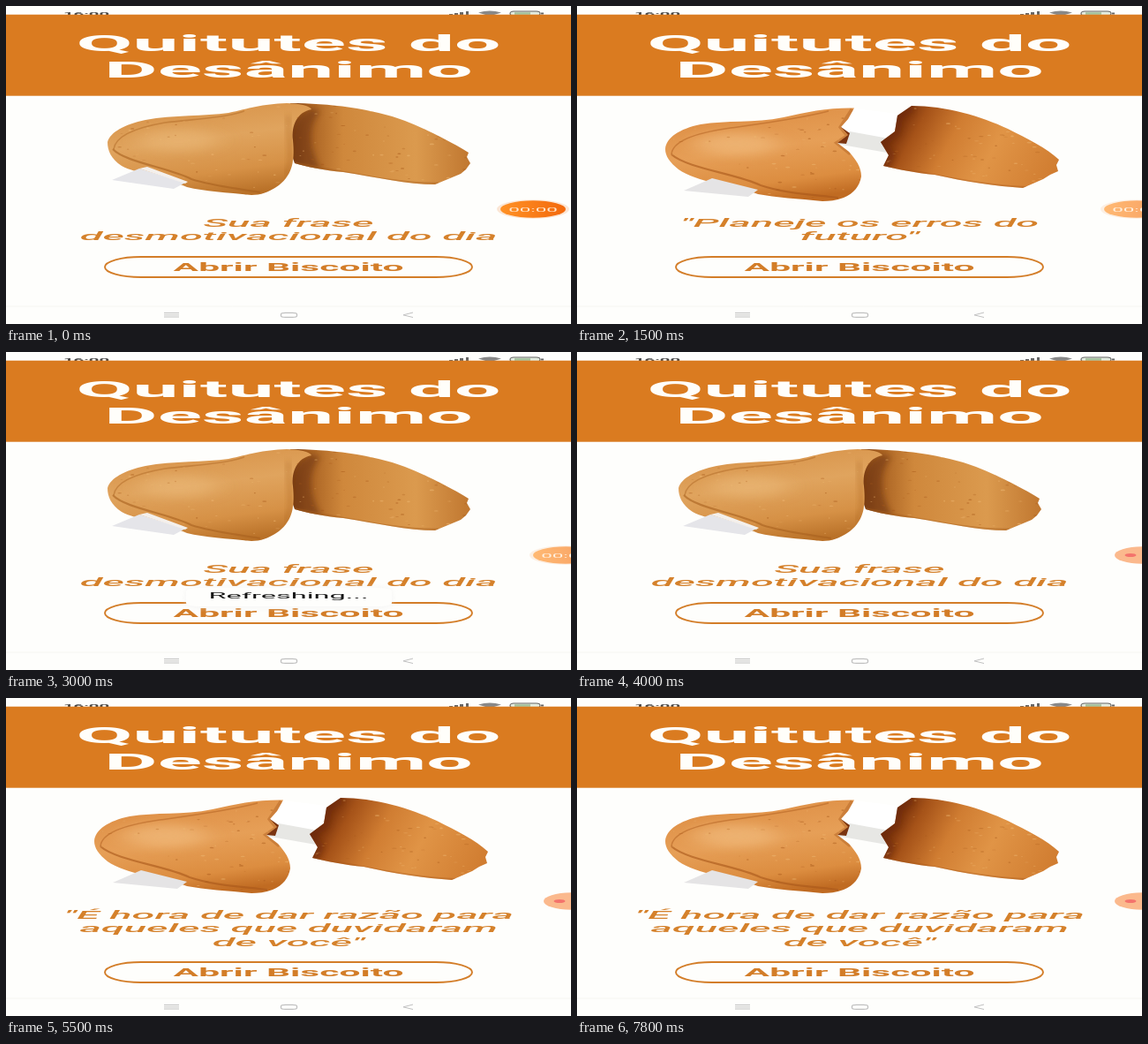
These frames come from a looping animation (640x360 px, 8 s). An HTML page:

```html
<!DOCTYPE html>
<html lang="pt">
<head>
<meta charset="utf-8">
<title>Quitutes do Desânimo</title>
<style>
html, body { margin: 0; width: 100%; height: 100%; overflow: hidden; background: #fefefc; }
svg { display: block; width: 640px; height: 360px; }
text { font-family: Roboto, Arial, sans-serif; text-anchor: middle; }
.title { font-size: 26.1px; font-weight: 700; fill: #fffefa; }
.phrase { font-size: 13.2px; font-weight: 500; font-style: italic; fill: #d5812b; }
.label { font-size: 11.95px; font-weight: 700; fill: #d37d28; }
.note { font-size: 9.15px; fill: #151515; }
.clock { font-size: 5.7px; font-weight: 700; fill: #444; }
.timer { font-size: 7px; fill: #ffe6cc; }

.whole, .split, .first, .second, .toast, .shift, .digits { animation: 8s step-end infinite; }
.whole { animation-name: whole; }
.split { animation-name: split; }
.first { animation-name: first; }
.second { animation-name: second; }
.toast { animation-name: toast; }
.shift { animation-name: shift; }
.digits { animation-name: digits; }
.press { animation: press 8s linear infinite; }
.ball { animation: ball 8s linear infinite; }
.dock { animation: dock 8s linear infinite; }

@keyframes whole { 0% { opacity: 1 } 3.125% { opacity: 0 } 35% { opacity: 1 } 64.375%, 100% { opacity: 0 } }
@keyframes split { 0% { opacity: 0 } 3.125% { opacity: 1 } 35% { opacity: 0 } 64.375%, 100% { opacity: 1 } }
@keyframes first { 0% { opacity: 0 } 3.125% { opacity: 1 } 35%, 100% { opacity: 0 } }
@keyframes second { 0% { opacity: 0 } 64.375%, 100% { opacity: 1 } }
@keyframes toast { 0% { opacity: 0 } 33.75% { opacity: 1 } 42.5%, 100% { opacity: 0 } }
@keyframes shift { 0% { transform: translateY(0) } 64.375%, 100% { transform: translateY(15px) } }
@keyframes press {
  0%, 1.25% { opacity: 1 } 2.5%, 3.125% { opacity: .2 } 5.625%, 60.5% { opacity: 1 }
  62.4%, 64.375% { opacity: .2 } 67.5%, 100% { opacity: 1 }
}
@keyframes ball {
  0%, 12.5% { transform: none; opacity: 1 }
  16.25%, 46.25% { transform: translateX(37px); opacity: .64 }
  50%, 100% { transform: translateX(49px); opacity: 0 }
}
@keyframes dock { 0%, 46.25% { opacity: 0 } 50%, 100% { opacity: 1 } }
@keyframes digits {
  0% { transform: none } 5% { transform: translateY(-30px) } 16.25% { transform: translateY(-60px) }
  28.75% { transform: translateY(-90px) } 41.25%, 100% { transform: translateY(-120px) }
}
</style>
</head>
<body>
<svg viewBox="0 0 640 360">
  <defs>
    <linearGradient id="dough" x1=".3" y1="0" x2=".6" y2="1">
      <stop offset="0" stop-color="#d79248"/><stop offset=".4" stop-color="#e0a45e"/>
      <stop offset=".75" stop-color="#d69146"/><stop offset="1" stop-color="#b97128"/>
    </linearGradient>
    <linearGradient id="flap">
      <stop offset="0" stop-color="#6f330c"/><stop offset=".1" stop-color="#a65f20"/>
      <stop offset=".3" stop-color="#cf883c"/><stop offset=".7" stop-color="#db9a4e"/>
      <stop offset="1" stop-color="#c07730"/>
    </linearGradient>
    <linearGradient id="warm" x1=".3" y1="0" x2=".6" y2="1">
      <stop offset="0" stop-color="#dd8d43"/><stop offset=".45" stop-color="#e69f57"/>
      <stop offset=".8" stop-color="#dc8d40"/><stop offset="1" stop-color="#c06b22"/>
    </linearGradient>
    <linearGradient id="piece" x1="0" y1=".5" x2="1" y2=".75">
      <stop offset="0" stop-color="#6e2a08"/><stop offset=".14" stop-color="#a55218"/>
      <stop offset=".35" stop-color="#d07d32"/><stop offset=".6" stop-color="#e09446"/>
      <stop offset="1" stop-color="#d07c30"/>
    </linearGradient>
    <linearGradient id="glow">
      <stop offset="0" stop-color="#ff9226"/><stop offset="1" stop-color="#f3690c"/>
    </linearGradient>
    <filter id="soft" x="-20%" y="-20%" width="140%" height="140%"><feGaussianBlur stdDeviation="3"/></filter>
    <filter id="haze" x="-50%" y="-80%" width="200%" height="260%"><feGaussianBlur stdDeviation="14 6"/></filter>
    <clipPath id="ballClip"><ellipse cx="597" cy="230" rx="37" ry="9.7"/></clipPath>
    <path id="wholeLeft" d="M115 154C118 143 134 134 158 129C190 123 225 125 252 121C275 116 290 111 318 110C332 110 344 113 346 117C330 120 323 135 325 152C327 172 326 190 309 203C298 211 288 214 278 214C250 211 225 210 205 205C180 194 148 190 131 181C119 173 115 164 115 154Z"/>
    <path id="wholeRight" d="M322 110C365 110 415 116 452 130C482 142 508 156 524 166L522 171L526 178L521 185L515 190L503 195L486 202C455 202 420 194 382 188C360 186 341 182 327 178C319 158 319 132 322 110Z"/>
    <path id="splitLeft" d="M100 162C101 149 116 139 140 134C170 129 200 133 234 126C260 120 285 115 314 115.500L307 128L299 137L307 146L295 155L308 165C316 174 322 182 322 193C320 204 314 212 302 217C293 220 286 221 278 221C250 218 226 217 205 213C180 204 134 199 115 185C105 177 100 170 100 162Z"/>
    <path id="splitRight" d="M379 113C418 113 458 125 488 139C510 150 532 161 546 174L543 180L545 187L536 191L528 196L505 206C475 204 440 199 405 191C384 189 364 185 347 181L353 169L344 154L360 142L363 124Z"/>
    <clipPath id="wholeClip"><use href="#wholeLeft"/><use href="#wholeRight"/></clipPath>
    <clipPath id="splitClip"><use href="#splitLeft"/><use href="#splitRight"/></clipPath>
  </defs>

  <rect width="640" height="360" fill="#fefefc"/>

  <!-- status bar -->
  <g fill="#666">
    <text class="clock" transform="translate(91 10.8) scale(3.556 1)">16:00</text>
    <path d="M502 9h4v2h-4zM508 8h4v3h-4zM514 7h4v4h-4zM521 6h3v5h-3z"/>
    <path d="M535 7.5Q548 3.5 561 7.5L548 11.5Z" fill="#888"/>
    <rect x="571" y="6" width="34" height="5" rx="4" fill="#e3ece0" stroke="#666" stroke-width="1.2"/>
    <path d="M606 7.5h3v2h-3z"/>
    <path d="M576 7.2h18v2.6h-18z" fill="#a3c19c"/>
  </g>
  <rect y="9.7" width="640" height="92" fill="#da7b20"/>
  <g class="title">
    <text transform="translate(320 51) scale(3.556 1)">Quitutes do</text>
    <text transform="translate(320 81) scale(3.556 1)">Desânimo</text>
  </g>

  <g class="whole">
    <use href="#wholeRight" fill="url(#flap)"/>
    <g clip-path="url(#wholeClip)">
      <path d="M346 116C326 124 322 148 327 180L358 187C344 165 340 138 356 119Z" fill="#743a12" opacity=".65" filter="url(#soft)"/>
      <path d="M327 179C380 188 440 203 490 202" fill="none" stroke="#a45b1b" stroke-width="5" opacity=".4"/>
    </g>
    <use href="#wholeLeft" fill="url(#dough)"/>
    <g clip-path="url(#wholeClip)" fill="none" stroke="#a9621f">
      <ellipse cx="195" cy="152" rx="45" ry="13" fill="#ecbb7c" stroke="none" opacity=".55" filter="url(#haze)"/>
      <path d="M122 162C124 148 145 138 180 132C215 128 245 127 270 119" stroke-width="1.6" opacity=".45"/>
      <path d="M121 162C135 177 185 183 210 196C235 204 260 206 288 211" stroke-width="2.2" opacity=".6"/>
      <path d="M320 124C318 145 328 170 317 193" stroke-width="5" opacity=".4" filter="url(#soft)"/>
      <g class="crumbs"></g>
    </g>
    <path d="M120 197L151 184L203 200L190 207Z" fill="#e5e5e9"/>
    <path d="M151 184L160 182L206 199L203 201Z" fill="#f4f0ec"/>
    <g class="phrase">
      <text transform="translate(320 250) scale(3.556 1)">Sua frase</text>
      <text transform="translate(320 265.3) scale(3.556 1)">desmotivacional do dia</text>
    </g>
  </g>

  <g class="split">
    <path d="M300 137L314 116L363 122L360 142L350 150L308 146Z" fill="#fff"/>
    <path d="M294 156L309 142L353 150L346 156L351 166Z" fill="#e7e7e4"/>
    <path d="M299 137L309 144L305 156L295 155Z" fill="#7b3410"/>
    <use href="#splitRight" fill="url(#piece)"/>
    <use href="#splitLeft" fill="url(#warm)"/>
    <g clip-path="url(#splitClip)" fill="none" stroke="#a9571a">
      <ellipse cx="180" cy="156" rx="48" ry="13" fill="#f2bd80" stroke="none" opacity=".65" filter="url(#haze)"/>
      <path d="M107 168C108 152 138 143 174 138C210 133 250 128 285 119" stroke-width="1.6" opacity=".45"/>
      <path d="M107 168C125 184 182 190 208 203C235 212 260 213 296 217" stroke-width="2.2" opacity=".6"/>
      <path d="M347 182C400 190 460 205 510 206" stroke-width="4" opacity=".4"/>
      <path d="M379 113L363 124L360 142L344 154L353 169L347 181" stroke="#6e2a08" stroke-width="14" opacity=".55" filter="url(#soft)"/>
      <path d="M312 117L299 137L307 147L295 155L310 167" stroke-width="5" opacity=".4"/>
      <g class="crumbs"></g>
    </g>
    <path d="M121 209L153 195L205 208L194 216Z" fill="#e5e4e5"/>
  </g>

  <g class="phrase first">
    <text transform="translate(320 250) scale(3.556 1)">"Planeje os erros do</text>
    <text transform="translate(320 265.3) scale(3.556 1)">futuro"</text>
  </g>
  <g class="phrase second">
    <text transform="translate(320 250) scale(3.556 1)">"É hora de dar razão para</text>
    <text transform="translate(320 265.3) scale(3.556 1)">aqueles que duvidaram</text>
    <text transform="translate(320 280.5) scale(3.556 1)">de você"</text>
  </g>

  <g class="shift"><g class="press">
    <rect x="112" y="284" width="416" height="23" rx="41" ry="11.5" fill="#fefefc" stroke="#d37d28" stroke-width="1.9"/>
    <text class="label" transform="translate(320 300) scale(3.556 1)">Abrir Biscoito</text>
  </g></g>

  <g class="toast">
    <rect x="204" y="267" width="233" height="22" rx="14" ry="4" fill="#eee" opacity=".6" filter="url(#soft)"/>
    <rect x="204" y="267" width="233" height="21" rx="14" ry="4" fill="#fefefc"/>
    <text class="note" transform="translate(320 278.5) scale(3.556 1)">Refreshing...</text>
  </g>

  <!-- navigation bar -->
  <g fill="none" stroke="#c0c0c0" stroke-width="1">
    <path d="M0 340H640" stroke="#f6f6f2"/>
    <path d="M179 347.5h17M179 349.8h17M179 352h17M461 347L450 349.8L461 352.5"/>
    <rect x="311.5" y="347.3" width="18" height="5" rx="5" ry="1.6" stroke-width="1.3"/>
  </g>

  <g class="ball">
    <ellipse cx="597" cy="230" rx="41" ry="10.8" fill="#fbe6d5"/>
    <ellipse cx="597" cy="230" rx="37" ry="9.7" fill="url(#glow)"/>
    <g clip-path="url(#ballClip)"><g class="digits timer"></g></g>
  </g>
  <g class="dock">
    <ellipse cx="640" cy="230" rx="31" ry="9.7" fill="#fbb98d"/>
    <ellipse cx="627" cy="230" rx="6.5" ry="2" fill="#f4736c"/>
  </g>
</svg>
<script>
const NS = 'http://www.w3.org/2000/svg';
function add(parent, tag, attrs) {
  const el = document.createElementNS(NS, tag);
  for (const key in attrs) el.setAttribute(key, attrs[key]);
  return parent.appendChild(el);
}

const digits = document.querySelector('.digits');
for (let i = 0; i < 5; i++) {
  add(digits, 'text', { transform: `translate(597 ${232.6 + i * 30}) scale(3.2 1)` }).textContent = '00:0' + i;
}

// Seeded speckles on the baked surface
let seed = 17;
const rand = () => (seed = seed * 16807 % 2147483647) / 2147483647;
for (const box of document.querySelectorAll('.crumbs')) {
  for (let i = 0; i < 170; i++) {
    add(box, 'ellipse', {
      cx: 100 + rand() * 445, cy: 112 + rand() * 106,
      rx: .8 + rand() * 2, ry: .4 + rand() * .5,
      stroke: 'none', fill: rand() < .5 ? '#a95b1c' : '#edb873', opacity: .2 + rand() * .35
    });
  }
}
</script>
</body>
</html>
```
